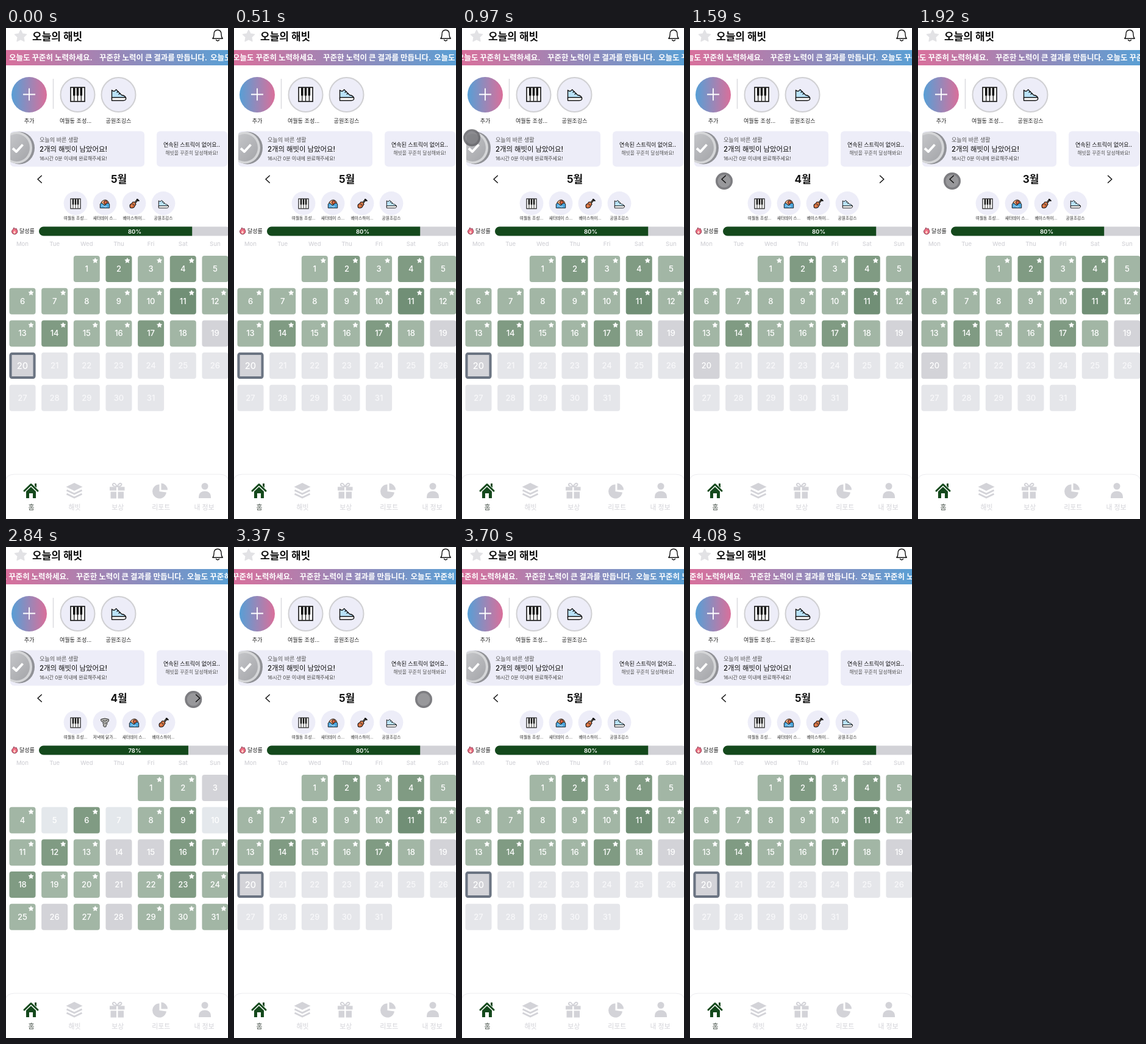
An HTML page for the animation above (4110 ms loop, 364 by 802 pixels).

```html
<!DOCTYPE html>
<html lang="ko">
<head>
<meta charset="utf-8">
<title>오늘의 해빗</title>
<style>
  html, body { margin: 0; width: 100%; height: 100%; overflow: hidden; background: #fff; }
  svg { display: block; width: 100vw; height: 100vh; }
  text { font-family: Inter, "Noto Sans CJK KR", "Noto Sans CJK", sans-serif; white-space: pre; }
</style>
</head>
<body>
<svg id="stage" viewBox="0 0 364 802" xmlns="http://www.w3.org/2000/svg">
  <defs>
    <linearGradient id="banner"><stop stop-color="#d8709c"/><stop offset="1" stop-color="#5a9fd4"/></linearGradient>
    <linearGradient id="add"><stop stop-color="#579fd6"/><stop offset="1" stop-color="#da6f9a"/></linearGradient>
    <linearGradient id="metal" x2="1" y2="1"><stop stop-color="#c9cacd"/><stop offset="1" stop-color="#a4a5a9"/></linearGradient>
    <clipPath id="cardClip"><rect x="7" y="168.5" width="220" height="58" rx="6"/></clipPath>

    <g id="piano" stroke="#111" stroke-width="1.6">
      <rect x="-11.5" y="-11.5" width="23" height="23" fill="#fff"/>
      <path d="M-5.8 0V11M0 0V11M5.8 0V11" stroke-width="1.3"/>
      <path d="M-5.8-11V2M0-11V2M5.8-11V2" stroke-width="3.6"/>
    </g>
    <g id="shoe" stroke="#111" stroke-width="1.4" stroke-linejoin="round">
      <path d="M-11 2V-7Q-7-3-4-8L5 1Q12 2 12 7H-11Z" fill="#b9e2f8"/>
      <path d="M-11 5H12V8Q11 10 8 10H-11Z" fill="#fff"/>
      <path d="M-3-3l3-2M0 0l3-2" fill="none"/>
    </g>
    <g id="swim" stroke="#111" stroke-width="1.3" stroke-linejoin="round">
      <path d="M-10 3Q-9-8 1-9Q10-8 10 3Z" fill="#f0a878"/>
      <circle cx="2" cy="-3" r="4" fill="#d9633f"/>
      <path d="M-11 1Q-7-4-4 1T3 1T11 1V10H-11Z" fill="#4ba6dd"/>
      <path d="M-8 6Q-5 3-2 6T5 6" fill="none" stroke="#d9f1ff"/>
    </g>
    <g id="guitar" stroke="#111" stroke-linejoin="round" stroke-linecap="round">
      <path d="M0 0L8-9" stroke-width="4.5"/>
      <path d="M7-10l4 3" stroke-width="3"/>
      <path d="M-3-4Q1-5 3-1Q6 2 2 4Q1 9-4 10Q-10 11-10 5Q-10 1-6 0Z" fill="#d96d3b" stroke-width="1.5"/>
      <circle cx="-2" cy="2" r="2" fill="#43231a" stroke="none"/>
      <path d="M-6 6l12-13" stroke="#f3d4a8" stroke-width="1"/>
    </g>
    <g id="meat" stroke="#222" stroke-width="1.4" stroke-linejoin="round">
      <path d="M-9-8Q0-12 9-8Q11-3 5 0Q7 4 3 6Q5 10-1 10Q-5 8-3 4Q-6 2-3-1Q-10-2-9-8Z" fill="#b8b8b5"/>
      <path d="M-5-5Q1-2 6-6M-1 1Q3 2 4 0" fill="none"/>
    </g>
  </defs>
  <rect width="364" height="802" fill="#fff"/>
  <g id="page"></g>
  <g id="ticker"></g>
  <g id="cursor">
    <circle r="14" fill="#67676b" fill-opacity=".68"/>
    <circle r="12.2" fill="none" stroke="#55555a" stroke-opacity=".4" stroke-width="3.4"/>
  </g>
  <g id="arrows" fill="none" stroke="#111" stroke-width="1.5" stroke-linecap="round" stroke-linejoin="round">
    <path d="M58.3 241.2L52 247L58.3 252.8"/>
    <path id="next" d="M311.5 241.2L317.8 247L311.5 252.8"/>
  </g>
</svg>
<script>
const LOOP = 4110, TICKER_SPEED = 0.01348, TICKER_PERIOD = 330;
const $ = id => document.getElementById(id);
const page = $('page');
const add = (markup, parent = page) => parent.insertAdjacentHTML('beforeend', markup);

const label = (s, x, y, size, o = {}) =>
  `<text x="${x}" y="${y}" font-size="${size}" font-weight="${o.weight || 400}" fill="${o.fill || '#222'}"
    text-anchor="${o.anchor || 'start'}">${s}</text>`;
const centered = (s, x, y, size, o = {}) => label(s, x, y, size, { ...o, anchor: 'middle' });
const icon = (name, x, y, scale) =>
  `<use href="#${name}" transform="translate(${x} ${y}) scale(${scale})"/>`;

function star(cx, cy, r, fill) {
  const points = Array.from({ length: 10 }, (_, i) => {
    const a = i * Math.PI / 5, d = i % 2 ? r * 0.5 : r;
    return `${(cx + d * Math.sin(a)).toFixed(2)},${(cy - d * Math.cos(a)).toFixed(2)}`;
  }).join(' ');
  return `<polygon points="${points}" fill="${fill}" stroke="${fill}" stroke-width="${r * 0.15}" stroke-linejoin="round"/>`;
}

function drawTop() {
  add(star(24, 13.5, 10, '#e2e2e5') + label('오늘의 해빗', 43, 19.5, 17, { weight: 700, fill: '#111' }));
  add(`<path d="M338.8 17.3Q341 15 341 10.5Q341 3.2 347 3.2T353 10.5Q353 15 355.2 17.3ZM344.5 19.5Q347 22.5 349.5 19.5"
    fill="none" stroke="#111" stroke-width="1.4" stroke-linejoin="round" stroke-linecap="round"/>
    <rect y="36" width="364" height="25" fill="url(#banner)"/>
    <circle cx="38" cy="109" r="29" fill="url(#add)"/>
    <path d="M28 108.5H48M38 98.5V118.5" stroke="#fff" stroke-width="1.8"/>
    <path d="M77.5 83V132" stroke="#dcdce0" stroke-width="1.6"/>`);
  add(centered('추가', 38, 155, 9.1));
  [['piano', '여월동 조성...', 117.5], ['shoe', '공원조깅스', 184.5]].forEach(([name, text, x]) =>
    add(`<circle cx="${x}" cy="109" r="28" fill="#ededf8" stroke="#d0d0d3" stroke-width="2"/>`
      + icon(name, x, 108.5, 1) + centered(text, x - (name === 'piano' ? 3.5 : 0), 155, 9.1)));
}

function drawCards() {
  add(`<rect x="7" y="168.5" width="220" height="58" rx="6" fill="#ededf8"/>
    <rect x="247" y="168.5" width="116" height="58" rx="6" fill="#ededf8"/>
    <g clip-path="url(#cardClip)">
      <ellipse cx="22" cy="196" rx="25" ry="26.5" fill="#919297"/>
      <ellipse cx="18" cy="195.5" rx="25" ry="26" fill="#d5d6d8"/>
      <ellipse cx="17.5" cy="195.5" rx="21.5" ry="22.5" fill="url(#metal)"/>
      <path d="M11 196.5L17 202L27.5 190.5" fill="none" stroke="#fff" stroke-width="4" stroke-linejoin="round"/>
    </g>`);
  add(label('오늘의 바른 생활', 55, 186, 9.1, { fill: '#555' })
    + label('2개의 해빗이 남았어요!', 55, 202, 11.4, { weight: 500, fill: '#111' })
    + label('16시간 0분 이내에 완료해주세요!', 55, 216, 8, { fill: '#444' })
    + centered('연속된 스트릭이 없어요..', 304.5, 194, 9, { weight: 500, fill: '#111' })
    + centered('해빗을 꾸준히 달성해봐요!', 304.5, 207, 7.9, { fill: '#555' }));
}

function drawProgressFrame() {
  add(`<path d="M13 326Q14 328 15.5 328.5L16.5 327Q19.5 331 18.5 334Q17 337 14 337Q10 336.5 9.5 333Q9.5 330 11.5 329Z"
      fill="#ef7185" stroke="#7c2940" stroke-width=".9"/>
    <path d="M14 331Q17 334 14 336Q11.5 335 12.5 333Z" fill="#ffd5c8"/>
    <rect x="54" y="324.5" width="314" height="15" rx="7.5" fill="#d2d2d7"/>`);
  add(label('달성률', 22, 335, 9));
  ['Mon', 'Tue', 'Wed', 'Thu', 'Fri', 'Sat', 'Sun'].forEach((d, i) =>
    add(centered(d, 27 + 52.65 * i, 356, 9.5, { weight: 500, fill: '#d3d3d8' })));
}

const habits = {
  piano: '여월동 조성...', meat: '저녁에 닭가...', swim: '새터데이 스...', guitar: '베이스하이...', shoe: '공원조깅스'
};
function habitRow(names) {
  return names.map((name, i) => {
    const x = 114 + 48 * i;
    return `<circle cx="${x}" cy="286.3" r="19.4" fill="#ededf8"/>` + icon(name, x, 287, 0.7)
      + centered(habits[name], x, 313, 6.7);
  }).join('');
}

// One letter per day; upper case adds a star.
const shades = { m: '#a2b6a5', d: '#809b83', x: '#718f76', g: '#d3d3d8', f: '#e5e6ea', l: '#e4e8ec' };
function calendar(days, firstColumn, percent) {
  const end = 54 + 314 * percent / 100;
  const cells = [...days].map((code, i) => {
    const slot = i + firstColumn;
    const x = 5.5 + 52.65 * (slot % 7), y = 372 + 52.7 * Math.floor(slot / 7);
    return `<rect x="${x}" y="${y}" width="43" height="43" rx="4" fill="${shades[code.toLowerCase()]}"/>`
      + centered(i + 1, x + 21.5, y + 26, 13, { weight: 500, fill: code === 'f' ? '#f8f8fa' : '#fff' })
      + (code < 'a' ? star(x + 35.5, y + 8, 4.3, '#fff') : '');
  }).join('');
  return `<path d="M${end} 324.5H61.5a7.5 7.5 0 0 0 0 15H${end}Z" fill="#14491c"/>`
    + centered(percent + '%', 211, 335.5, 9.6, { weight: 600, fill: '#fff' }) + cells;
}

function drawNav() {
  add(`<path d="M-1 803V742Q-1 729 14 729H350Q365 729 365 742V803Z" fill="#fff" stroke="#ececef"/>
    <g fill="#d3d3d8" stroke-linejoin="round">
      <path d="M30 756L41 745.5L52 756" fill="none" stroke="#14491c" stroke-width="3" stroke-linecap="round"/>
      <path d="M33 757L41 749.5L49 757V768H44V760H38V768H33Z" fill="#14491c"/>
      <path d="M47 744h3v7l-3-3Z" fill="#14491c"/>
      <path d="M112 743L125.5 749.5L112 756L98.5 749.5Z"/>
      <path d="M99.5 755L112 761L124.5 755M99.5 761L112 767L124.5 761" fill="none" stroke="#d3d3d8" stroke-width="2.8"/>
      <path d="M170 749.5H181V755.5H170ZM183.500 749.500H194.500V755.500H183.500ZM171.500 757.500H181V768.500H171.500ZM183.500 757.500H193V768.500H183.500Z"/>
      <path d="M182 749Q174 749 175 745Q178 741 182 749Q187 741 189.500 745Q190 749 182 749Z" fill="none" stroke="#d3d3d8" stroke-width="2"/>
      <path d="M251.500 745.500A11.500 11.500 0 1 0 263 758.500L251.500 757Z"/>
      <path d="M254.500 743.500A11 11 0 0 1 265 754.500H254.500Z"/>
      <circle cx="326" cy="748.500" r="5.500"/>
      <path d="M316 768Q315.500 756.500 326 756.500T336 768Z"/>
    </g>`);
  ['홈', '해빗', '보상', '리포트', '내 정보'].forEach((s, i) =>
    add(centered(s, 41.5 + 70.9 * i, 787, 10.9, { weight: 500, fill: i ? '#d3d3d8' : '#4b554d' })));
}

drawTop();
drawCards();
drawProgressFrame();
drawNav();
add(centered('5월', 185, 253, 17, { weight: 700, fill: '#111' }).replace('<text', '<text id="month"'));
add(`<g id="mayHabits">${habitRow(['piano', 'swim', 'guitar', 'shoe'])}</g>
  <g id="marchHabits">${habitRow(['piano', 'meat', 'swim', 'guitar'])}</g>
  <g id="mayGrid">${calendar('MDMDmMMmMMXMMDMMDmgg' + 'f'.repeat(11), 2, 80)}</g>
  <g id="marchGrid">${calendar('MMgMlDlMDlMDMggDMDMMgMDMMgMgMMM', 4, 78)}</g>
  <g id="today"><rect x="7.500" y="532.100" width="39" height="39" rx="2.500" fill="#d3d3d8" stroke="#6b7482" stroke-width="4"/>
    ${centered('20', 27, 557, 14.5, { weight: 500, fill: '#fff' })}</g>`);

const tickerStyle = { weight: 700, fill: '#fff' };
for (let k = -1; k < 2; k++) {
  add(label('오늘도 꾸준히 노력하세요.', 5 + k * TICKER_PERIOD, 53, 12.5, tickerStyle)
    + label('꾸준한 노력이 큰 결과를 만듭니다.', 153 + k * TICKER_PERIOD, 53, 12.5, tickerStyle), $('ticker'));
}

const monthSteps = [[0, 5], [1400, 4], [1850, 3], [2790, 4], [3130, 5]];
// Each key is time, x, y, opacity.
const cursorKeys = [
  [850, 2, 166, 0], [900, 6, 170, 1], [970, 16, 179, 1], [1080, 34, 212, 1], [1250, 56, 250, 1],
  [2040, 56, 250, 1], [2120, 56, 250, 0], [2560, 296, 251, 0], [2640, 302, 250, 1], [2750, 307, 249, 1],
  [3100, 308, 249, 1], [3300, 311, 249, 1], [3430, 311, 249, 1], [3620, 320, 278, 1], [3700, 322, 284, 0]
];

function cursorAt(t) {
  const i = cursorKeys.findIndex(key => key[0] > t);
  if (i < 1) return [0, 0, 0];
  const from = cursorKeys[i - 1], to = cursorKeys[i];
  const u = (t - from[0]) / (to[0] - from[0]);
  return [1, 2, 3].map(k => from[k] + (to[k] - from[k]) * u);
}

const show = (id, on) => $(id).setAttribute('display', on ? 'inline' : 'none');

function render(t) {
  const month = monthSteps.filter(step => step[0] <= t).pop()[1];
  const marchHabits = t >= 2140 && t < 3200;
  const marchGrid = t >= 2200 && t < 3200;
  $('month').textContent = month + '월';
  show('next', month < 5);
  show('marchHabits', marchHabits);
  show('mayHabits', !marchHabits);
  show('marchGrid', marchGrid);
  show('mayGrid', !marchGrid);
  show('today', month === 5 && !marchGrid);
  $('ticker').setAttribute('transform', `translate(${-t * TICKER_SPEED} 0)`);
  const [x, y, opacity] = cursorAt(t);
  $('cursor').setAttribute('transform', `translate(${x} ${y})`);
  $('cursor').setAttribute('opacity', opacity);
}

const start = performance.now();
function tick() {
  render((performance.now() - start) % LOOP);
  requestAnimationFrame(tick);
}
tick();
</script>
</body>
</html>
```
